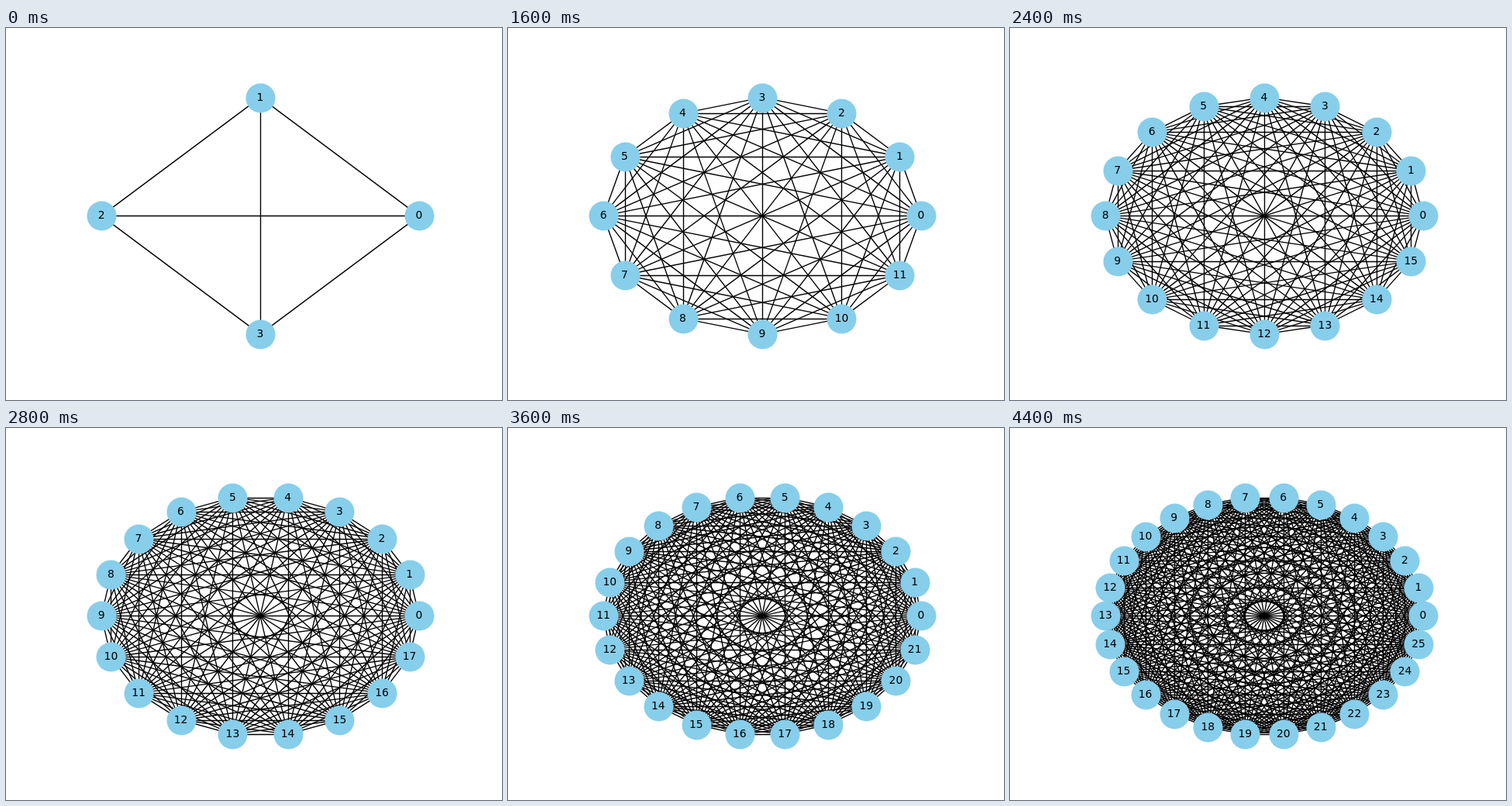
An HTML page with a canvas that plays this animation: 640x480 px, repeating every 4600 ms.

```html
<!DOCTYPE html>
<html lang="en">
<head>
<meta charset="utf-8">
<title>Complete graphs</title>
<style>
  html, body { margin: 0; width: 100%; height: 100%; overflow: hidden; background: #fff; }
  canvas { display: block; }
</style>
</head>
<body>
<canvas id="stage" width="640" height="480"></canvas>
<script>
const ctx = document.getElementById('stage').getContext('2d');
const STEP = 200, FIRST = 4, LAST = 26;
const CENTER_X = 328, CENTER_Y = 242.4;
const HALF_W = 248 / 1.21, HALF_H = 184.8 / 1.21;
const NODE_RADIUS = 19.07, LINE_WIDTH = 100 / 72, FONT_SIZE = 1000 / 72;

const snap = v => Math.floor(v + 0.5) + 0.5;

// Nodes on a circle, stretched so their extent always fills the same box.
function layout(count) {
  const points = Array.from({ length: count }, (_, i) => {
    const angle = 2 * Math.PI * i / count;
    return { x: Math.cos(angle), y: Math.sin(angle) };
  });
  const minX = Math.min(...points.map(p => p.x));
  const maxY = Math.max(...points.map(p => p.y));
  return points.map(p => ({
    x: CENTER_X + HALF_W * (2 * (p.x - minX) / (1 - minX) - 1),
    y: CENTER_Y - HALF_H * p.y / maxY
  }));
}

// Horizontal and vertical edges sit on pixel centres to stay crisp.
function drawEdge(a, b) {
  const aligned = Math.abs(a.x - b.x) < 1e-4 || Math.abs(a.y - b.y) < 1e-4;
  const place = aligned ? snap : v => v;
  ctx.beginPath();
  ctx.moveTo(place(a.x), place(a.y));
  ctx.lineTo(place(b.x), place(b.y));
  ctx.stroke();
}

function drawGraph(count) {
  const nodes = layout(count);
  ctx.fillStyle = '#fff';
  ctx.fillRect(0, 0, 640, 480);

  ctx.strokeStyle = '#000';
  ctx.lineWidth = LINE_WIDTH;
  nodes.forEach((a, i) => nodes.slice(i + 1).forEach(b => drawEdge(a, b)));

  ctx.fillStyle = '#87ceeb';
  for (const { x, y } of nodes) {
    ctx.beginPath();
    ctx.arc(snap(x), snap(y), NODE_RADIUS, 0, 2 * Math.PI);
    ctx.fill();
  }

  ctx.fillStyle = '#000';
  ctx.font = `${FONT_SIZE}px "DejaVu Sans", sans-serif`;
  ctx.textAlign = 'center';
  nodes.forEach(({ x, y }, i) => ctx.fillText(i, x, Math.round(y + 4)));
}

const start = performance.now();
let shown = 0;

function tick() {
  const step = Math.floor((performance.now() - start) / STEP);
  const count = FIRST + step % (LAST - FIRST + 1);
  if (count !== shown) drawGraph(shown = count);
  requestAnimationFrame(tick);
}
tick();
</script>
</body>
</html>
```
